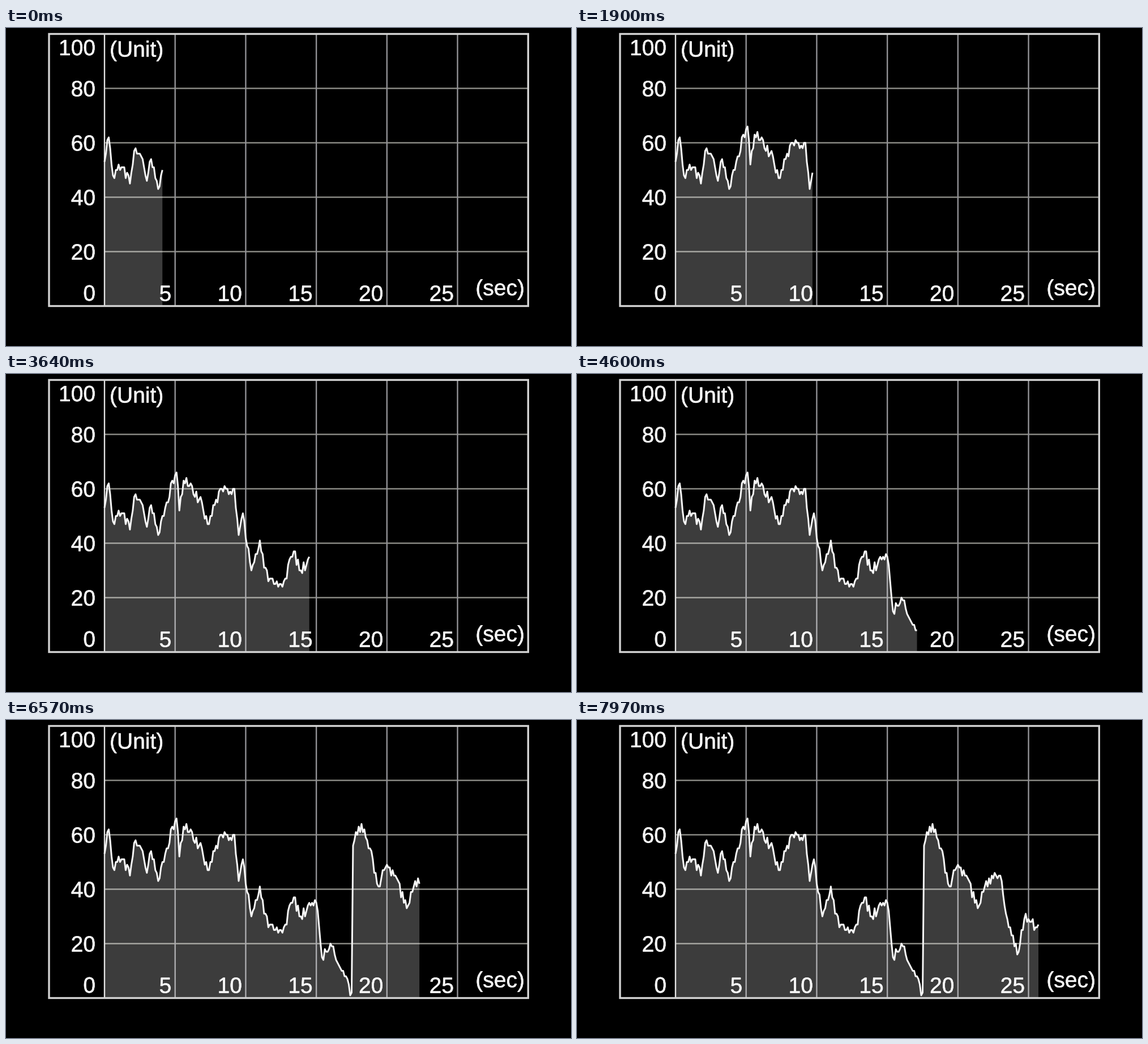
A matplotlib script that plays this animation: 998 by 561 pixels, repeating every 8 s.

```python
import numpy as np
import matplotlib.pyplot as plt
from matplotlib.animation import FuncAnimation
from matplotlib.patheffects import withStroke

W, H, DPI = 998, 561, 64
FRAMES, STEP_MS = 250, 32
LEFT, RIGHT, TOP, BASE = 174, 922.3, 10.5, 490.5
SEC_W = (RIGHT - LEFT) / 30
UNIT_H = (BASE - TOP) / 100
INK = "#f6f6f6"

# Main turns of the signal: tenths of a second, level.
TURNS = np.array([
    (0, 53), (3, 62), (6, 48), (12, 51), (18, 45), (22, 58), (27, 54),
    (30, 46), (33, 54), (38, 43), (44, 55), (51, 66), (53, 52), (56, 63),
    (69, 55), (73, 47), (82, 60), (92, 60), (95, 43), (98, 51), (104, 30),
    (110, 41), (113, 31), (120, 25), (126, 24), (134, 37), (139, 30),
    (150, 35), (154, 15), (161, 19), (168, 10), (175, 2), (176, 56),
    (182, 64), (188, 55), (194, 41), (199, 48), (206, 45), (214, 33),
    (219, 41), (230, 45), (235, 29), (242, 16), (247, 29), (258, 26),
])


def make_signal():
    """Join the turns and roughen the stretches between them."""
    ticks = np.arange(TURNS[-1, 0] + 1)
    noise = np.random.default_rng(4).uniform(-2, 2, len(ticks))
    noise[TURNS[:, 0]] = 0
    level = np.round(np.interp(ticks, *TURNS.T) + noise)
    return LEFT + SEC_W * ticks / 10, BASE - UNIT_H * level


def px(size):
    return size * 72 / DPI


def rule(x, y, color, width, z=1):
    ax.plot(x, y, color=color, lw=px(width), zorder=z, snap=False,
            solid_capstyle="butt", solid_joinstyle="miter")


def label(x, y, text, ha="right"):
    ax.text(x, y, text, color=INK, fontsize=px(39), ha=ha, va="baseline",
            family="Liberation Sans", zorder=5,
            path_effects=[withStroke(linewidth=px(0.5), foreground=INK)])


fig = plt.figure(figsize=(W / DPI, H / DPI), dpi=DPI, facecolor="black")
ax = fig.add_axes([0, 0, 1, 1])
ax.set_xlim(0, W)
ax.set_ylim(H, 0)
ax.axis("off")

for level in range(20, 100, 20):
    y = BASE - UNIT_H * level
    rule([LEFT, RIGHT], [y, y], "#8e8e88", 2.4)
    label(158, y + 14, str(level))
for sec in range(5, 30, 5):
    x = LEFT + SEC_W * sec
    rule([x, x], [TOP, BASE], "#929296", 2.4)
    label(x - 6.5, 481.5, str(sec))
label(158, 48, "100")
label(158, 481, "0")
label(183, 50.5, "(Unit)", "left")
label(916, 471.5, "(sec)")

rule([LEFT, LEFT], [TOP, BASE], "#e4e4e4", 2.4, 3)
ax.add_patch(plt.Rectangle((76, TOP), RIGHT - 76, BASE - TOP, fill=False,
                           ec="#d2d2d2", lw=px(3.4), snap=False, zorder=3))

xs, ys = make_signal()
area, = ax.fill([LEFT], [BASE], color="white", alpha=0.24, lw=0, zorder=2)
trace, = ax.plot([], [], color=INK, lw=px(3), zorder=4,
                 solid_joinstyle="round", solid_capstyle="butt")


def update(frame):
    t = (frame + 0.5) * STEP_MS / 1000
    n = int(round(41 + 30.05 * t - 0.37 * t * t)) + 1   # slows slightly
    x, y = xs[:n], ys[:n]
    trace.set_data(x, y)
    area.set_xy(np.column_stack([np.r_[LEFT, x, x[-1]], np.r_[BASE, y, BASE]]))
    return area, trace


anim = FuncAnimation(fig, update, frames=FRAMES, interval=STEP_MS,
                     init_func=lambda: update(0), repeat=True, repeat_delay=0)
plt.show()
```
